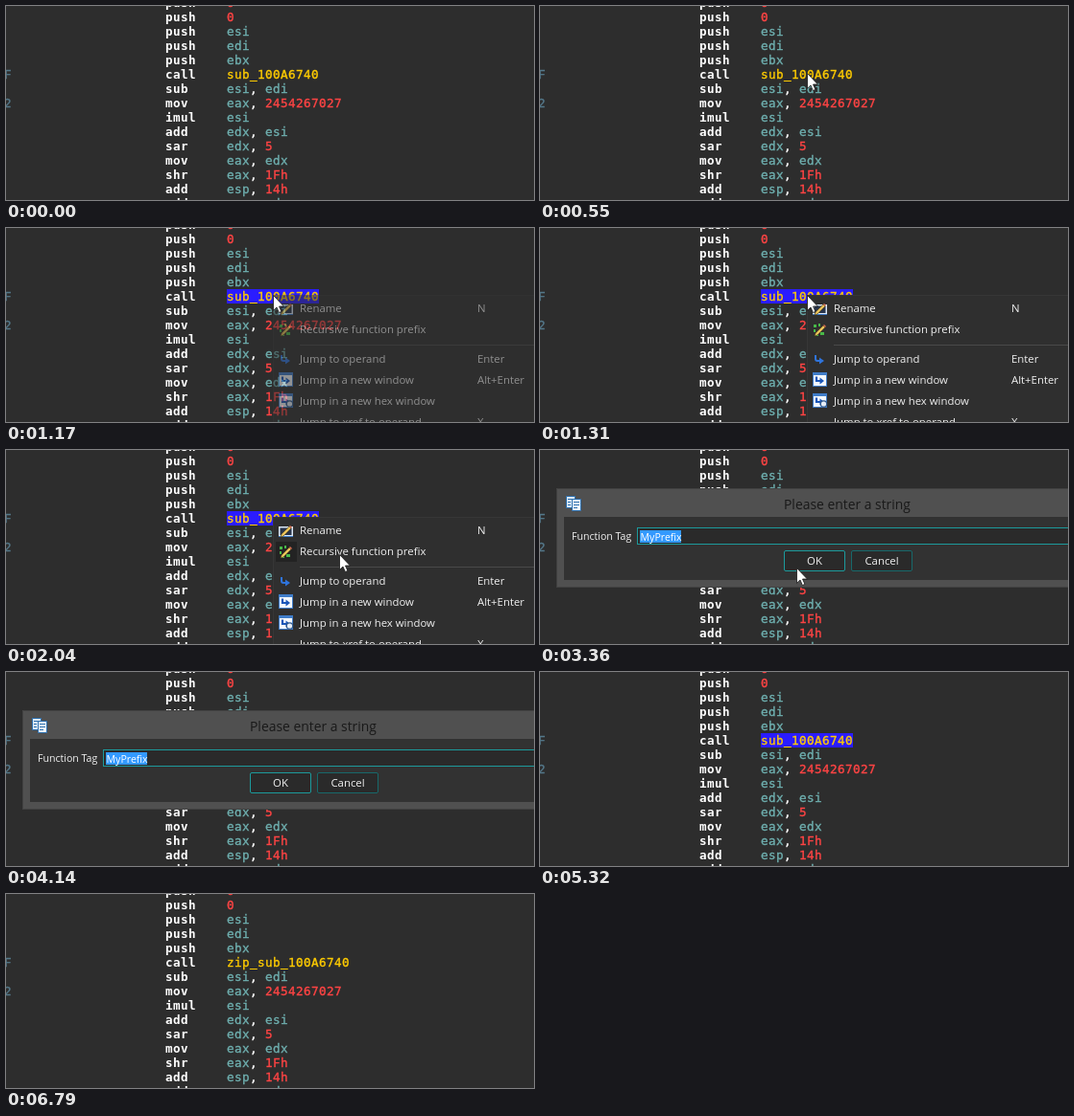
These frames come from a looping animation (550x203 px, 7.12 s). An HTML page:

```html
<!DOCTYPE html>
<html lang="en">
<head>
<meta charset="utf-8">
<title>Recursive function prefix</title>
<style>
html, body { margin: 0; width: 100%; height: 100%; overflow: hidden; background: #2d2d2d; }
svg { display: block; width: 550px; height: 203px; }
text { white-space: pre; }
/* .602em advance plus spacing gives an 8px grid */
.code { font: 12.6px "DejaVu Sans Mono", monospace; letter-spacing: .414px; }
.code text { stroke-width: .35px; }
.code .op { font-weight: bold; stroke: none; }
.ui { font: 11.4px "Open Sans", "Noto Sans", sans-serif; fill: #f0f0f0; }
.small { font-size: 10.6px; }
.title { font-size: 13.9px; fill: #191919; }
</style>
</head>
<body>
<svg id="stage" viewBox="0 0 550 203">
  <defs>
    <g id="pencil">
      <path d="M3 11 11 3l2 2-8 8-3 1z" fill="#e8c25a" stroke="#4a3a18" stroke-width=".6"/>
      <path d="M11 3l1-1 2 2-1 1z" fill="#d86a50"/>
    </g>
    <g id="window">
      <rect x=".5" y=".5" width="14" height="14" fill="#f4f8fc" stroke="#3f7cc8"/>
      <path d="M1 2h13" stroke="#3f7cc8" stroke-width="2"/>
      <path d="M4 4.5V9h4" fill="none" stroke="#1a56b8" stroke-width="2.2"/>
      <path d="M7.5 5.5 12 9l-4.5 3.5z" fill="#1a56b8"/>
    </g>
  </defs>
  <rect width="550" height="203" fill="#2d2d2d"/>
  <rect id="select" x="230" y="64" width="96" height="15" fill="#2a1cff"/>
  <g id="code" class="code"></g>
  <rect id="codeCaret" x="277" y="64" width="2" height="14" fill="#f0f0f0"/>

  <g id="menu">
    <rect x="278" y="70" width="272" height="133" fill="#2f2f2f"/>
    <path d="M278.5 203V70.5H550" fill="none" stroke="#363636"/>
    <rect id="hover" x="281" y="74" width="22" height="21" fill="#232323"/>
    <path d="M306 122.5H550" stroke="#4a4a4a"/>
    <g id="items" class="ui"></g>
    <g transform="translate(284 77)">
      <rect x=".75" y="3.75" width="13.5" height="9" fill="#28344a" stroke="#dce8f6" stroke-width="1.5"/>
      <path d="M0 13.5h15" stroke="#3f7cc8"/>
      <use href="#pencil"/>
    </g>
    <g transform="translate(284 99)">
      <path d="M1 2h3v3H1zM6 1h2v3H6zM1 7h2v3H1zM8 10h4v3H8zM3 12h3v2H3z" fill="#48b848"/>
      <use href="#pencil"/>
    </g>
    <g transform="translate(285 131)">
      <path d="M2 2v4q0 2 2 2h3" fill="none" stroke="#2f74dc" stroke-width="2"/>
      <path d="M6 4.5 11 8l-5 3.5z" fill="#2f74dc"/>
    </g>
    <use href="#window" x="284" y="151"/>
    <use href="#window" x="284" y="173"/>
    <circle cx="295.5" cy="184" r="3.2" fill="#e6eef8" stroke="#30598c" stroke-width="1.2"/>
  </g>

  <g id="dialog" class="ui">
    <rect x="17" y="40" width="533" height="104" fill="#505050"/>
    <path d="M17.5 144V40.5H550M17 143.5H550" fill="none" stroke="#424242"/>
    <rect x="25" y="70" width="525" height="66" fill="#323232"/>
    <g stroke="#2d6fae">
      <path d="M27.5 48.5h9v12h-9z" fill="#dcebf7"/>
      <path d="M29 51.5h5M29 54.5h3M29 57.5h3"/>
      <path d="M33.5 51.5h9v12h-9z" fill="#f6fafd"/>
      <path d="M35 54.5h6M35 57.5h6M35 60.5h4"/>
    </g>
    <text class="title" x="254" y="62">Please enter a string</text>
    <text class="small" x="33" y="94">Function Tag</text>
    <rect x="101.5" y="81.5" width="460" height="17" fill="#2a2a2a" stroke="#1c9a9c"/>
    <rect id="fieldSelect" x="104" y="84" width="43" height="13" fill="#3399ff"/>
    <text id="field" class="small" x="104.5" y="94.5" style="fill:#fff"></text>
    <rect id="fieldCaret" y="84" width="1" height="13" fill="#f0f0f0"/>
    <g fill="#2a2a2a" stroke="#1c9a9c">
      <rect x="254.5" y="105.5" width="63" height="21" rx="1.5"/>
      <rect id="cancel" x="324.5" y="105.5" width="63" height="21" rx="1.5"/>
    </g>
    <text x="286" y="120" text-anchor="middle">OK</text>
    <text x="356" y="120" text-anchor="middle">Cancel</text>
  </g>

  <path id="cursor" d="M.5.5V16.3L4 13 6.4 18.5 8.9 17.4 6.5 12H11.4Z" fill="#fff" stroke="#1a1a1a" stroke-width=".8"/>
</svg>
<script>
const LOOP = 7120;
const $ = id => document.getElementById(id);
const TEAL = '#6fb0b0', RED = '#ff4444', GOLD = '#ffcc00', WHITE = '#ffffff', DIM = '#54788a';

function addText(parent, x, y, str, fill) {
  const el = document.createElementNS('http://www.w3.org/2000/svg', 'text');
  el.setAttribute('x', x);
  el.setAttribute('y', y);
  if (fill) {
    el.setAttribute('fill', fill);
    el.setAttribute('stroke', fill);
  }
  el.textContent = str;
  return parent.appendChild(el);
}

const listing = [
  'push 0', 'push 0', 'push esi', 'push edi', 'push ebx', 'call sub_100A6740',
  'sub esi, edi', 'mov eax, 2454267027', 'imul esi', 'add edx, esi', 'sar edx, 5',
  'mov eax, edx', 'shr eax, 1Fh', 'add esp, 14h', 'add eax, edx'
];
let callName;
listing.forEach((line, i) => {
  const y = 1 + i * 15, gap = line.indexOf(' ');
  addText($('code'), 166, y, line.slice(0, gap), WHITE).setAttribute('class', 'op');
  let x = 230;
  for (const part of line.slice(gap + 1).match(/\w+|\W+/g)) {
    const fill = /^\W/.test(part) ? WHITE : /^\d/.test(part) ? RED : /^sub_/.test(part) ? GOLD : TEAL;
    const el = addText($('code'), x, y, part, fill);
    if (fill === GOLD) callName = el;
    x += part.length * 8;
  }
});
addText($('code'), -2, 76, 'F', DIM);
addText($('code'), -2, 106, '2', DIM);

[
  ['Rename', 'N', 88], ['Recursive function prefix', '', 110], ['Jump to operand', 'Enter', 141],
  ['Jump in a new window', 'Alt+Enter', 163], ['Jump in a new hex window', '', 185],
  ['Jump to xref to operand', 'X', 207]
].forEach(([label, key, y]) => {
  addText($('items'), 306, y, label);
  if (key) addText($('items'), 491, y, key);
});

const show = (id, on) => $(id).setAttribute('visibility', on ? 'inherit' : 'hidden');
const within = (t, a, b) => t >= a && t < b;
// value of the last [time, value] pair already reached
const at = (t, pairs) => pairs.reduce((v, [start, next]) => t >= start ? next : v, pairs[0][1]);

// pointer jumps: index of the position held between times a and b, n positions
function stepped(t, a, b, n) {
  const k = Math.floor((t - a) / (b - a) * (n - 1) + 1e-6);
  return Math.min(n - 1, k);
}
const mix = (p, x0, y0, x1, y1) => [x0 + (x1 - x0) * p, y0 + (y1 - y0) * p];
const ease = p => p * p * (3 - 2 * p);

function pointer(t) {
  if (t < 170 || t >= 3690) return null;
  if (t < 1780) return mix(1 - Math.pow(1 - stepped(t, 170, 550, 9) / 8, 1.6), 419, 172, 278, 70);
  if (t < 2910) return mix(ease((stepped(t, 1780, 2040, 7) + 1) / 7), 278, 70, 347, 109);
  if (t < 3630) return mix(Math.pow((stepped(t, 2910, 3580, 12) + 1) / 12, 1.5), 347, 109, 200, 135);
  return [157, 175];
}

function draw(t) {
  const pos = pointer(t);
  show('cursor', pos);
  if (pos) $('cursor').setAttribute('transform', `translate(${pos.map(Math.round)})`);

  show('select', within(t, 990, 5380));
  callName.textContent = t >= 5380 ? 'zip_sub_100A6740' : 'sub_100A6740';
  show('codeCaret', within(t, 5380, 5810) || within(t, 6340, 6790));

  show('menu', within(t, 1060, 2510));
  $('menu').setAttribute('opacity', at(t, [[0, 0], [1060, .18], [1120, .34], [1170, .5], [1220, .75], [1310, 1]]));
  const over = pos && pos[1] >= 74;
  $('hover').setAttribute('y', over && pos[1] >= 95 ? 96 : 74);
  $('hover').setAttribute('opacity', over ? 1 : 0);

  show('dialog', within(t, 2560, 5320));
  show('fieldSelect', t < 4840);
  $('field').textContent = at(t, [[0, 'MyPrefix'], [4840, 'z'], [4930, 'zi'], [5130, 'zip']]);
  $('fieldCaret').setAttribute('x', at(t, [[0, 147], [4840, 109], [4930, 112], [5130, 118]]));
  show('fieldCaret', !within(t, 3090, 3580) && !within(t, 4140, 4650));
  const onCancel = pos && within(pos[0], 324, 388) && within(pos[1], 105, 127);
  $('cancel').setAttribute('stroke', onCancel ? '#1c9a9c' : '#17696b');
}

const start = performance.now();
function tick() {
  draw((performance.now() - start) % LOOP);
  requestAnimationFrame(tick);
}
tick();
</script>
</body>
</html>
```
